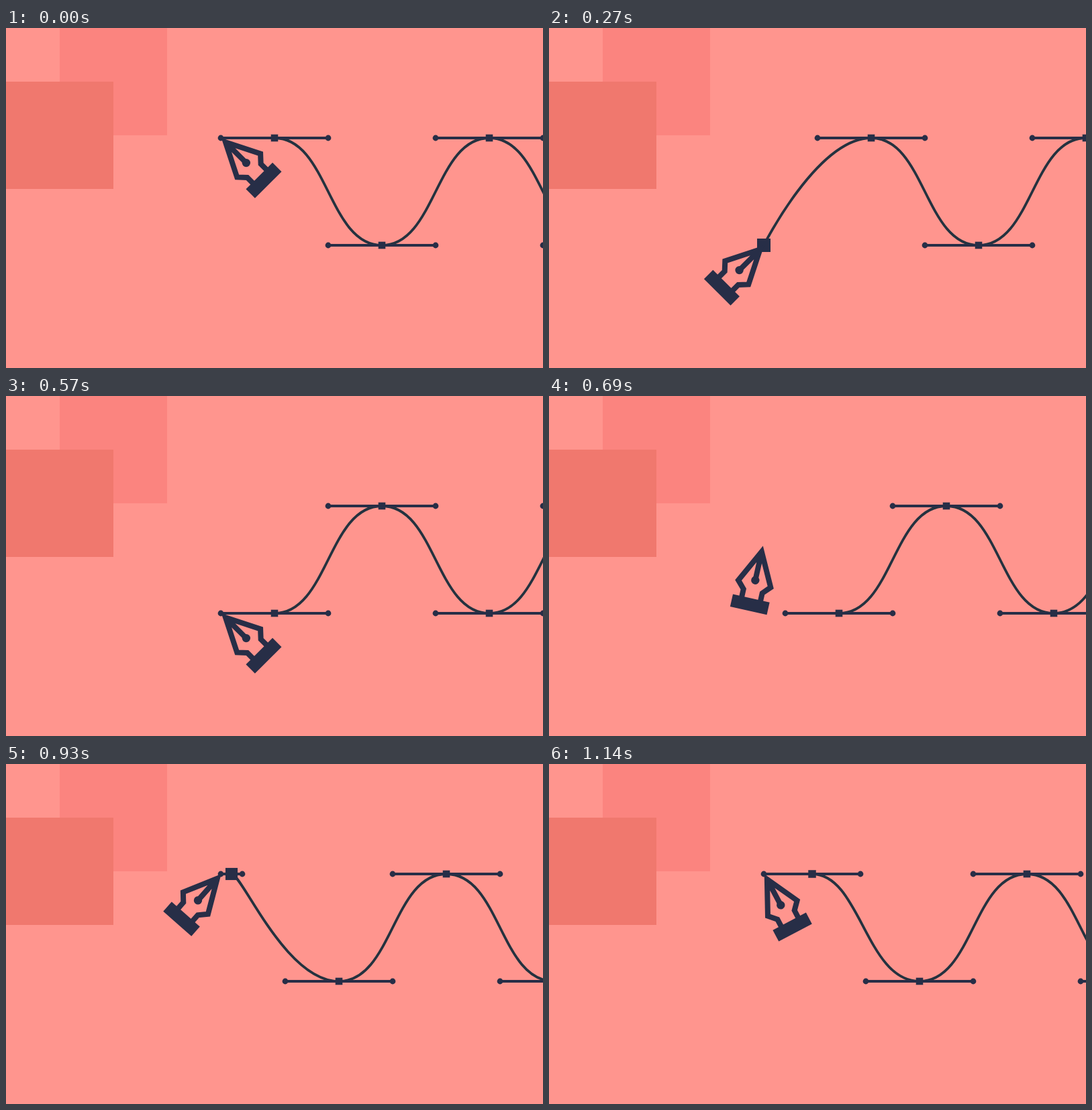
Write an HTML page that moves like this. It is 800 px wide and 507 px high and loops after 1.17 s.

```html
<!DOCTYPE html>
<html lang="en">
<head>
<meta charset="utf-8">
<title>Pen tool</title>
<style>
html, body { margin: 0; width: 100%; height: 100%; overflow: hidden; background: #ff958e; }
svg { display: block; width: 100%; height: 100%; }
.ink { fill: #272e47; }
.line { fill: none; stroke: #272e47; stroke-width: 4; }
.curve { fill: none; stroke: #24323f; stroke-width: 3.8; }
.nib { fill: none; stroke: #272e47; stroke-width: 8; }
</style>
</head>
<body>
<svg viewBox="0 0 800 507">
  <rect width="800" height="507" fill="#ff958e"/>
  <rect x="80" width="160" height="160" fill="#fb847f"/>
  <rect y="80" width="160" height="160" fill="#f0786e"/>
  <path id="curve" class="curve"/>
  <path id="handles" class="line"/>
  <g id="marks" class="ink"></g>
  <g id="pen">
    <path class="nib" d="M-14.3 82V69.1L-24.7 57.9L0 8.9L24.7 57.9L14.3 69.1V82M0 10V52"/>
    <circle class="ink" cy="52.5" r="6.2"/>
    <rect class="ink" x="-28" y="80" width="56" height="19"/>
  </g>
</svg>
<script>
const STEP = 30, STEPS = 39;
const LEFT = 320, TOP = 164, BOTTOM = 324, REACH = 80, GAP = 160;
const $ = id => document.getElementById(id);
const mix = (a, b, k) => a + (b - a) * k;
const easeIn = t => t * t;
const easeOut = t => t * (2 - t);

// Anchors are born at the pen tip and travel right.
function anchorsAt(shift) {
  const list = [];
  for (let j = 0; j < 7; j++) {
    const d = shift - 240 + GAP * j;
    if (d < -0.001) continue;
    const reach = Math.min(Math.max(d, 0), REACH);
    list.push({ x: LEFT + d, y: j % 2 ? BOTTOM : TOP, reach, size: mix(20, 10.6, reach / REACH) });
  }
  return list;
}

function penAt(phase) {
  const part = Math.floor(phase / 10), t = phase / 10 - part;
  const out = easeOut(t), back = easeIn(t);
  if (part === 0) return { y: mix(TOP, BOTTOM, out), angle: mix(-45, 45, out), drift: 0 };
  if (part === 1) return { y: BOTTOM, angle: mix(45, -45, back), drift: 0 };
  if (part === 2) return { y: mix(BOTTOM, TOP, out), angle: mix(-45, 45, out), drift: 8 * t * (1 - t) };
  return { y: TOP, angle: mix(45, -45, back), drift: 0 };
}

function draw(ms) {
  const n = Math.floor(ms / STEP) % STEPS;
  // The first quarter takes nine steps, the others ten.
  const phase = n < 9 ? n * 10 / 9 : n + 1;
  const anchors = anchorsAt(phase * 8);
  let curve = "", handles = "", marks = "";
  anchors.forEach((a, i) => {
    const from = a.x - a.reach, to = a.x + a.reach;
    if (i) {
      const b = anchors[i - 1];
      curve += `C${b.x + b.reach} ${b.y} ${from} ${a.y} ${a.x} ${a.y}`;
    } else {
      curve = `M${a.x} ${a.y}`;
    }
    handles += `M${from} ${a.y}H${to}`;
    if (a.reach > 0.01) {
      for (const x of [from, to]) marks += `<circle cx="${x}" cy="${a.y}" r="4.4"/>`;
    }
    const half = a.size / 2;
    marks += `<rect x="${a.x - half}" y="${a.y - half}" width="${a.size}" height="${a.size}"/>`;
  });
  $("curve").setAttribute("d", curve);
  $("handles").setAttribute("d", handles);
  $("marks").innerHTML = marks;
  const pen = penAt(phase);
  $("pen").setAttribute("transform",
    `translate(${LEFT + 0.7 - pen.drift} ${pen.y + pen.drift}) rotate(${pen.angle})`);
}

const start = performance.now();
function tick() {
  draw(performance.now() - start);
  requestAnimationFrame(tick);
}
tick();
</script>
</body>
</html>
```
